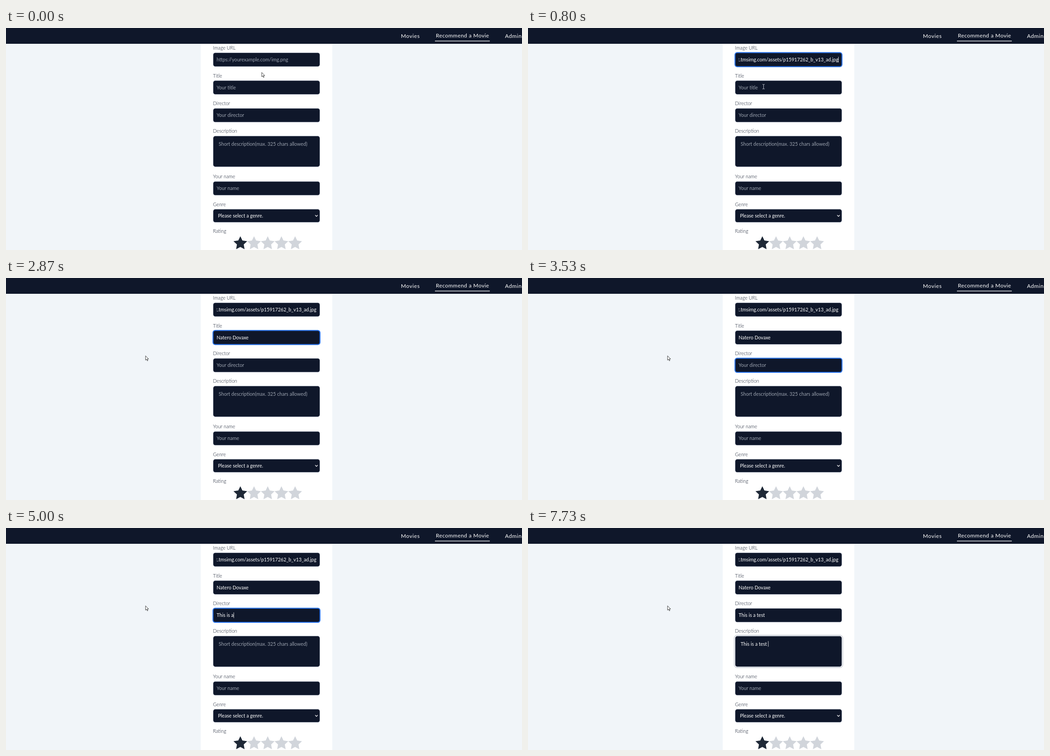
An HTML page for the animation above (8000 ms loop, 1138 px wide and 492 px high).

```html
<!DOCTYPE html>
<html lang="en">
<head>
<meta charset="utf-8">
<title>Recommend a Movie</title>
<style>
  html, body { margin: 0; width: 100%; height: 100%; overflow: hidden; background: #f1f5f9; }
  svg { display: block; }
  text { font: 10.667px Lato, sans-serif; fill: #fff; white-space: pre; }
  .label { font-weight: 300; fill: #0f172a; }
  .hint { fill: #9ca3af; }
  .nav text { font-size: 12px; letter-spacing: .6px; }
  .nav .active { letter-spacing: .42px; }
  .option { font: 8.5px "Open Sans", "Noto Sans", sans-serif; fill: #fbfbfe; }
</style>
</head>
<body>
<svg width="1138" height="492" viewBox="0 0 1138 492">
  <defs>
    <clipPath id="inner"><rect x="464.8" y="50" width="221" height="40"/></clipPath>
    <path id="star" d="M12 .587l3.668 7.568 8.332 1.151-6.064 5.828 1.48 8.279-7.416-3.967-7.417 3.967 1.481-8.279-6.064-5.828 8.332-1.151z"/>
  </defs>
  <rect width="1138" height="492" fill="#f1f5f9"/>
  <rect x="429.5" width="290" height="492" fill="#fff"/>
  <g class="nav">
    <rect width="1138" height="35" fill="#0f172a"/>
    <text x="871" y="21.6">Movies</text>
    <text x="948" y="21" class="active">Recommend a Movie</text>
    <rect x="946" y="28.2" width="121" height="1.3" fill="#fff"/>
    <text x="1100.4" y="21.6">Admin</text>
  </g>
  <g id="form"></g>
  <g id="live"></g>
</svg>
<script>
const LOOP = 8000, STEP = 200 / 3;
const LEFT = 457, WIDTH = 235;
const URL_TEXT = 'https://flxt.tmsimg.com/assets/p15917262_b_v13_ad.jpg';
const TITLE = 'Natero Dovaxe', NOTE = 'This is a test ';

const fields = [
  { label: 'Image URL', hint: 'https://yourexample.com/img.png', y: 55, h: 30.3 },
  { label: 'Title', hint: 'Your title', y: 116.7, h: 30.3 },
  { label: 'Director', hint: 'Your director', y: 178.3, h: 30.3 },
  { label: 'Description', hint: 'Short description(max. 325 chars allowed)', y: 239.6, h: 67.8, x: 469, base: 260.6 },
  { label: 'Your name', hint: 'Your name', y: 340.3, h: 30.3 },
  { label: 'Genre', y: 401.7, h: 28.8 }
];
for (const f of fields) {
  f.x ??= 464.6;
  f.base ??= f.y + 18.8;
}

// Times at which each further character appears
const titleKeys = [2200, 2330, 2470, 2600, 2730];
const directorKeys = [4330, 4530, 4600, 4670, 4730, 4800, 4870, 4930, 5000, 5130, 5200, 5200, 5400, 5470];
const noteKeys = [6470, 6670, 6730, 6800, 6870, 6930, 7000, 7070, 7200, 7270, 7330, 7400, 7600, 7600, 7730];

// Focused field and its caret: [start, end, field]
const focusSpans = [[330, 1000, 0], [1470, 3000, 1], [3000, 6000, 2], [6000, LOOP, 3]];
const caretOff = [[2000, 2200], [2870, 3000], [3530, 4070], [5730, 6000]];

const pointerPath = [
  [0, 564, 98.5], [70, 555, 80], [530, 555, 80], [800, 519.5, 130], [1000, 375.5, 165],
  [1130, 398.5, 136], [1330, 479.5, 141], [1470, 479.5, 141], [1870, 307.8, 172.5], [LOOP, 307.8, 172.5]
];

const form = document.getElementById('form');
const live = document.getElementById('live');
const ruler = document.createElement('canvas').getContext('2d');
ruler.font = '10.667px Lato, sans-serif';

const text = (x, y, str, attrs = '') => `<text x="${x}" y="${y}" ${attrs}>${str}</text>`;
const rect = (x, y, w, h, attrs) => `<rect x="${x}" y="${y}" width="${w}" height="${h}" ${attrs}/>`;
const line = (d, color, width = 1) => `<path d="${d}" fill="none" stroke="${color}" stroke-width="${width}"/>`;
const within = (t, [from, to]) => t >= from && t < to;
const typed = (str, keys, t) => str.slice(0, keys.filter(k => k <= t).length);

function drawForm() {
  let out = '';
  for (const f of fields) {
    out += text(456.6, f.y - 7.2, f.label, 'class="label"');
    out += rect(LEFT, f.y, WIDTH, f.h, 'rx="4.5" fill="#0f172a" stroke="#94a3b8" stroke-width=".5"');
  }
  out += text(467.4, 419.5, 'Please select a genre.');
  out += line('M681.8 414.6l2.9 2.9 2.9-2.9', '#fff', 1.3);
  out += text(456.6, 454, 'Rating', 'class="label"');
  for (let i = 0; i < 5; i++)
    out += `<use href="#star" transform="translate(${501.7 + i * 30.2} 460.7) scale(1.26)" fill="${i ? '#d1d5db' : '#1f2937'}"/>`;
  form.innerHTML = out;
}

function ring(i) {
  const f = fields[i];
  if (i === 3)
    return rect(456, f.y - 1, WIDTH + 2, f.h + 2, 'rx="5" fill="none" stroke="#fff" stroke-width="1.4"')
      + rect(454.9, f.y - 2.1, WIDTH + 4.2, f.h + 4.2, 'rx="6" fill="none" stroke="#aab1bd"');
  return rect(456.5, f.y - .5, WIDTH + 1, f.h + 1, 'rx="4.8" fill="none" stroke="#1d6bea" stroke-width="2"');
}

function list(y, options, scroll) {
  const h = options.length * 15.1 + 1.2;
  let out = rect(456.8, y, 235, h, 'fill="#2b2a33" stroke="#8f8f9d" stroke-width=".7"');
  options.forEach((o, i) => out += text(460.6, y + 11.6 + i * 15.1, o, 'class="option"'));
  if (scroll)
    out += rect(679, y + .4, 12.5, h - .8, 'fill="#23222b"')
      + rect(679, y + 13, 12.5, 24.5, 'fill="#77767d"')
      + line(`M682.3 ${y + 7.6}l3-3 3 3M682.3 ${y + h - 8.2}l3 3 3-3`, '#8a8991');
  return out;
}

function pointer(t) {
  const i = pointerPath.findIndex(p => p[0] > t);
  const [t0, x0, y0] = pointerPath[i - 1], [t1, x1, y1] = pointerPath[i];
  const k = (t - t0) / (t1 - t0), x = x0 + (x1 - x0) * k, y = y0 + (y1 - y0) * k;
  const overField = x > LEFT && x < LEFT + WIDTH && fields.some(f => y > f.y && y < f.y + f.h);
  return overField
    ? line(`M${x - 2.5} ${y - 5}h2l.5.6.5-.6h2M${x} ${y - 4.5}v9M${x - 2.5} ${y + 5}h2l.5-.6.5.6h2`, '#d5d9e0', .9)
    : `<path d="M${x} ${y}v9.6l2.2-2.1 1.6 3.6 1.5-.7-1.6-3.5h3z" fill="#fff" stroke="#111" stroke-width=".8"/>`;
}

function draw(t) {
  const values = [
    t >= 470 ? URL_TEXT : '',
    t >= 2870 ? TITLE : typed(TITLE, titleKeys, t),
    typed(NOTE, directorKeys, t),
    typed(NOTE, noteKeys, t),
    ''
  ];
  let out = '';
  values.forEach((v, i) => {
    const f = fields[i];
    if (!v) out += text(f.x, f.base, f.hint, 'class="hint"');
    else if (i === 0) out += `<g clip-path="url(#inner)">${text(684.6, f.base, v, 'text-anchor="end"')}</g>`;
    else out += text(f.x, f.base, v);
  });

  const focus = focusSpans.find(s => within(t, s));
  if (focus) {
    const i = focus[2], f = fields[i];
    out += ring(i);
    if (!caretOff.some(s => within(t, s))) {
      const x = Math.min(f.x + ruler.measureText(values[i]).width, 684.2);
      out += rect(x, f.base - 10, .8, 12.5, 'fill="#fff"');
    }
  }
  if (within(t, [2270, 2870])) out += list(146, ['Natero', TITLE, TITLE + ' 2'], false);
  if (within(t, [4400, 4600]))
    out += list(207.8, ['test', 'test2', 'test3', 'test4', 'test5', 'test6'], true);
  live.innerHTML = out + pointer(t);
}

const start = performance.now();
let shown = -1;
function tick() {
  const now = (performance.now() - start) % LOOP;
  const step = Math.min(Math.floor((now + 5) / STEP), LOOP / STEP - 1);
  if (step !== shown) {
    shown = step;
    draw(Math.round(step * STEP / 10) * 10);
  }
  requestAnimationFrame(tick);
}
drawForm();
tick();
</script>
</body>
</html>
```
